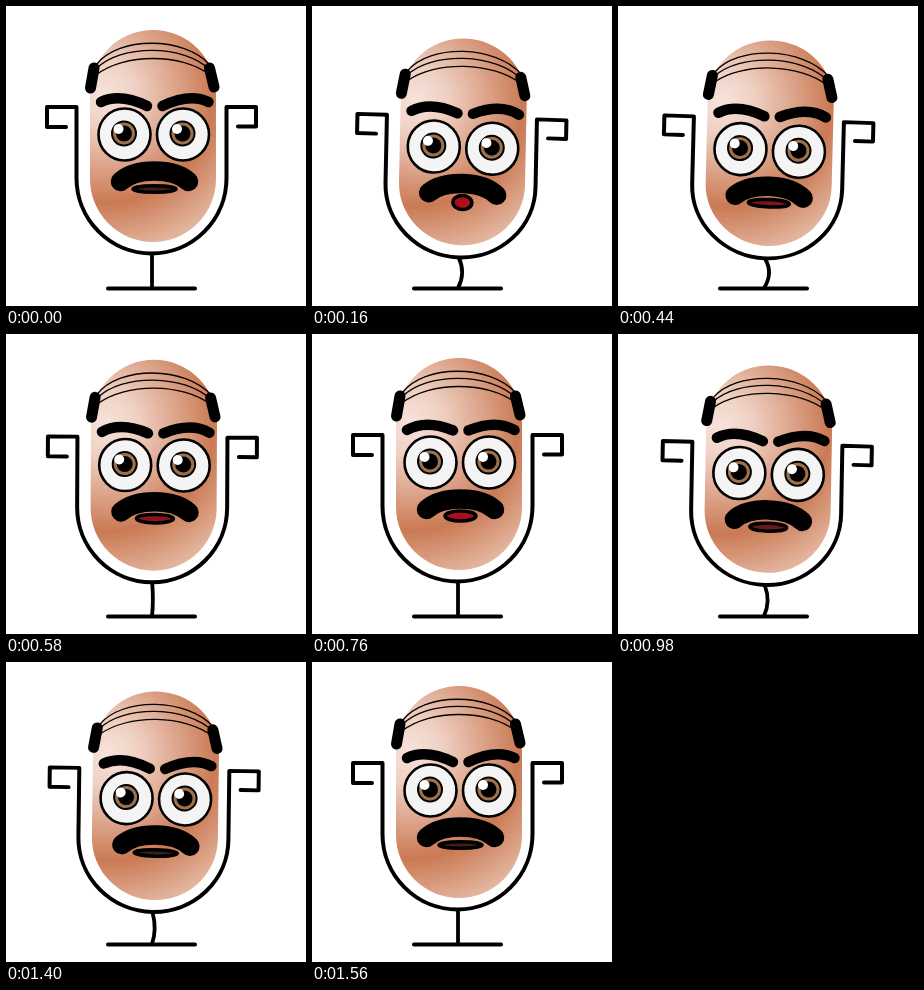
Write an HTML page that moves like this. It is 300x300 px and loops after 1760 ms.

```html
<!DOCTYPE html>
<html lang="en">
<head>
<meta charset="utf-8">
<title>Microphone face</title>
<style>
  html, body { margin: 0; width: 100%; height: 100%; overflow: hidden; background: #fff; }
  svg { display: block; width: 100vw; height: 100vh; }
  .line { fill: none; stroke: #000; stroke-linecap: round; stroke-linejoin: round; }
</style>
</head>
<body>
<svg viewBox="0 0 300 300">
  <defs>
    <radialGradient id="skin" gradientUnits="userSpaceOnUse" cx="98" cy="88" r="165">
      <stop offset="0" stop-color="#f7e3db"/>
      <stop offset=".2" stop-color="#efd0c3"/>
      <stop offset=".66" stop-color="#ca7a54"/>
      <stop offset="1" stop-color="#e6bca7"/>
    </radialGradient>
    <g id="iris">
      <circle r="12" fill="#9c714c" stroke="#000" stroke-width="2"/>
      <circle r="8"/>
      <circle cx="-5.500" cy="-4.500" r="5" fill="#fff"/>
    </g>
  </defs>

  <path class="line" stroke-width="4" d="M102 282.5H189"/>
  <path class="line" id="stem" stroke-width="3.8"/>
  <path class="line" id="mic" stroke-width="4"
    d="M60 121H41V101H70.500V172A75 75.500 0 0 0 220.500 172V101H250V120.500H232"/>

  <g id="head">
    <rect x="84" y="24" width="126" height="212" rx="63" fill="url(#skin)"/>
    <g class="line" stroke-width="1.3">
      <path d="M90 59C112 30 178 30 204 59"/>
      <path d="M90 63C114 38 178 38 204 64"/>
      <path d="M90 69C118 47 176 47 204 69"/>
    </g>
    <path class="line" stroke-width="11" d="M88 62L84.500 82M203.500 62L208 81"/>
  </g>

  <g id="brows" class="line" stroke-width="10.500">
    <path id="browL"/>
    <path id="browR"/>
  </g>
  <g id="eyes">
    <g fill="#f4f4f4" stroke="#000" stroke-width="2.600">
      <circle cx="118.500" cy="128.500" r="26"/>
      <circle cx="177" cy="128.500" r="26"/>
    </g>
    <use href="#iris" x="118" y="127.500"/>
    <use href="#iris" x="176.500" y="127.500"/>
  </g>
  <g id="lips">
    <ellipse id="mouth" cx="148.500" stroke="#000" stroke-width="3.500"/>
    <path class="line" stroke-width="19.500" d="M114.500 175.500C130 161.500 167 161.500 182.500 175.500"/>
  </g>
</svg>
<script>
  const LOOP = 1760, STEP = 20;
  const $ = id => document.getElementById(id);

  // time, dip of the body
  const dips = [[0, 0], [300, 1.08], [660, 0], [770, 0], [1180, 1], [1560, 0]];
  // time, mouth half width, half height, centre, redness, frown
  const moods = [
    [0, 21.5, 3.2, 183, 0, 1],
    [160, 9.5, 7, 184, 1, .2],
    [440, 20.5, 3.7, 182, .6, .4],
    [760, 15.5, 5, 182, 1, .1],
    [1160, 20.5, 3.2, 182.5, 0, .8],
    [1400, 21.5, 3.2, 183, 0, 1],
    [1560, 21.5, 3.2, 183, 0, 1]
  ];

  const mix = (a, b, k) => a + (b - a) * k;

  function sample(keys, t) {
    const i = keys.findIndex(k => k[0] > t);
    if (i < 0) return keys[keys.length - 1].slice(1);
    const [a, b] = [keys[i - 1], keys[i]];
    const k = (1 - Math.cos(Math.PI * (t - a[0]) / (b[0] - a[0]))) / 2;
    return a.slice(1).map((v, n) => mix(v, b[n + 1], k));
  }

  const set = (id, attrs) => {
    for (const name in attrs) $(id).setAttribute(name, attrs[name]);
  };

  // lean to the right while tilting and squashing
  const bend = (p, tilt, squash, drop) =>
    `matrix(1 ${tilt * p} ${-.034 * p} ${1 - squash * p} ${10.9 * p} ${drop * p})`;

  const slide = (p, dx, dy, y) =>
    `translate(${dx * p} ${dy * p}) rotate(${3.5 * p} 148 ${y})`;

  function draw(t) {
    const [p] = sample(dips, t);
    const [w, h, cy, red, frown] = sample(moods, t);

    set('mic', { transform: bend(p, .052, .07, 16.4) });
    set('head', { transform: bend(p, .045, .0425, 8.8) });
    set('stem', {
      d: `M${146 + 1.5 * p} ${248 + 6.5 * p}C${146 + 9 * p} ${260 + 3 * p} ${146 + 9 * p} 272 146 282`
    });

    set('brows', { transform: slide(p, 7.4, 18, 97) });
    const inner = 96 + 4 * frown, arch = 85 + 2 * frown;
    set('browL', { d: `M95 96Q114 ${arch} 141 ${inner}` });
    set('browR', { d: `M202.5 96Q184 ${arch} 156.5 ${inner}` });

    set('eyes', { transform: slide(p, 5.5, 22, 128) });

    set('lips', { transform: slide(p, 4, 21, 170) });
    set('mouth', {
      cy, rx: w, ry: h,
      fill: `rgb(${mix(60, 168, red)},${mix(32, 16, red)},${mix(24, 28, red)})`
    });
  }

  const start = performance.now();
  function tick() {
    const t = (performance.now() - start) % LOOP;
    draw(Math.floor(t / STEP) * STEP);
    requestAnimationFrame(tick);
  }
  draw(0);
  tick();
</script>
</body>
</html>
```
